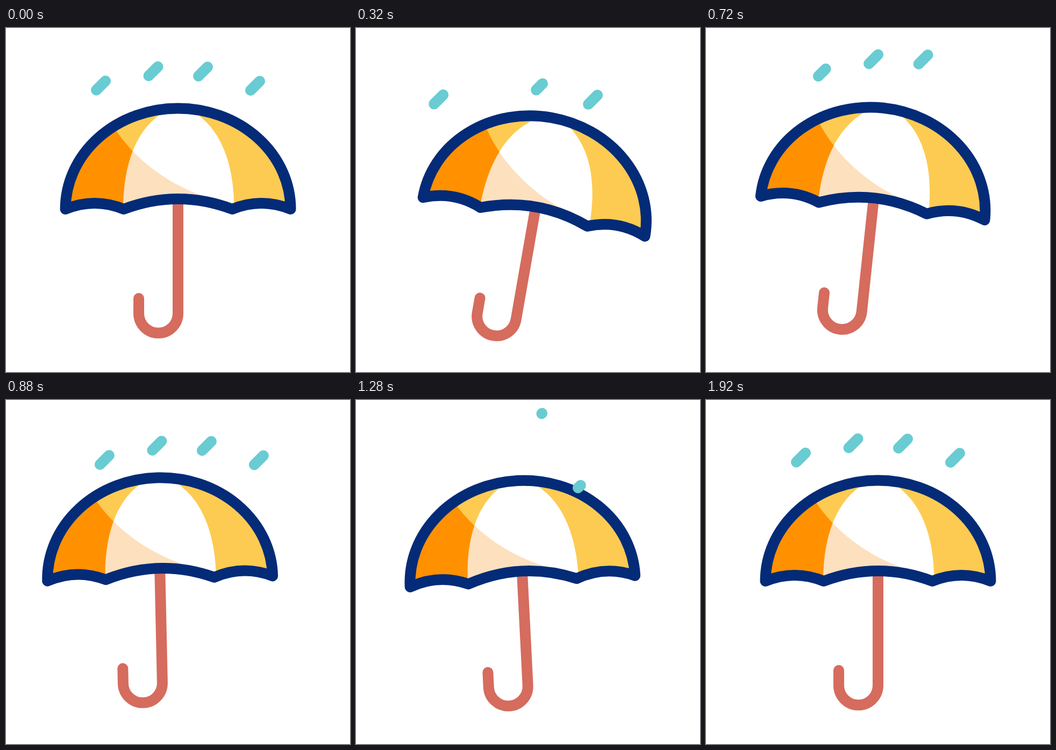
Recreate the animation shown at these times as an HTML page with a canvas. Size 640x640 px, loop 2000 ms.

```html
<!DOCTYPE html>
<html lang="en">
<head>
<meta charset="utf-8">
<title>Umbrella in the rain</title>
<style>
  html, body { margin: 0; width: 100%; height: 100%; overflow: hidden; background: #fff; }
  canvas { display: block; }
</style>
</head>
<body>
<canvas id="stage" width="640" height="640"></canvas>
<script>
const ctx = document.getElementById('stage').getContext('2d');
ctx.lineCap = ctx.lineJoin = 'round';
ctx.lineWidth = 20;

const canopy = new Path2D('M110.5 337A209.5 187.5 0 0 1 529.5 337Q475 315 421 337Q320 299 219 337Q165 315 110.5 337Z');
const leftPanel = new Path2D('M218 337C218 250 244 185 296 155L296 100H60V345H218Z');
const rightPanel = new Path2D('M424.5 337C424.5 250 398.5 185 346.5 155L346.5 100H580V345H424.5Z');
const shade = new Path2D('M195 175C230 235 290 285 365 312V345H60V175Z');
const handle = new Path2D('M320 325V531A36.5 36.5 0 0 1 247 531V503');

// Key rows: time, values...
const turnKeys = [[0, 0], [480, 13.4], [1020, -4.2], [1720, 0]];
const moveKeys = [[0, 0, 0], [440, -28.6, 14], [800, -31.3, -5.4], [1280, 0, 0]];

// Lower end of each drop at rest, in order of appearance
const drops = [[265.5, 89], [358, 89.5], [168, 115.5], [455, 116]];
const dropLength = 17;

// Each shower: path keys, start and stagger of growing, start and stagger of shrinking
const high = [78, -58], low = [-42, 47.5];
const showers = [
  { path: [[0, 0, 0], [605, ...low]], grow: [-2000, 90], shrink: [203, 90] },
  { path: [[360, ...high], [1285, ...low]], grow: [515, 73], shrink: [942, 91] },
  { path: [[1080, ...high], [1810, 0, 0]], grow: [1275, 118], shrink: [9000, 90] }
];

const clamp = x => Math.min(1, Math.max(0, x));
const smooth = s => s * s * (3 - 2 * s);

function ease(keys, t) {
  let i = 1;
  while (i < keys.length - 1 && t > keys[i][0]) i++;
  const [t0, ...a] = keys[i - 1], [t1, ...b] = keys[i];
  const k = smooth(clamp((t - t0) / (t1 - t0)));
  return a.map((v, n) => v + (b[n] - v) * k);
}

function fill(path, color) {
  ctx.fillStyle = color;
  ctx.fill(path);
}

function stroke(path, color) {
  ctx.strokeStyle = color;
  ctx.stroke(path);
}

function drawUmbrella(t) {
  const [turn] = ease(turnKeys, t), [dx, dy] = ease(moveKeys, t);
  ctx.save();
  ctx.translate(320 + dx, 537 + dy);
  ctx.rotate(turn * Math.PI / 180);
  ctx.translate(-320, -537);
  stroke(handle, '#d56c5e');
  ctx.save();
  ctx.clip(canopy);
  fill(canopy, '#fff');
  fill(shade, '#fde0be');
  fill(leftPanel, '#fdcb52');
  fill(rightPanel, '#fdcb52');
  ctx.clip(leftPanel);
  fill(shade, '#ff9100');
  ctx.restore();
  stroke(canopy, '#042b77');
  ctx.restore();
}

function drawShower({ path, grow, shrink }, t) {
  const [dx, dy] = ease(path, t);
  drops.forEach(([x, y], i) => {
    const phase = ([start, step]) => (t - start - i * step) / step;
    const grown = phase(grow), shrunk = phase(shrink);
    if (grown < 0 || shrunk >= 1) return;
    const front = dropLength * (1 - clamp(grown));
    const back = dropLength * (1 - clamp(shrunk));
    const line = new Path2D();
    line.moveTo(x + dx + front, y + dy - front);
    line.lineTo(x + dx + back + 0.01, y + dy - back);
    stroke(line, '#68ccd2');
  });
}

function draw(now) {
  const t = Math.min(1920, Math.floor(now % 2000 / 40) * 40);
  ctx.fillStyle = '#fff';
  ctx.fillRect(0, 0, 640, 640);
  drawUmbrella(t);
  showers.forEach(s => drawShower(s, t));
}

const begin = performance.now();
function tick() {
  draw(performance.now() - begin);
  requestAnimationFrame(tick);
}
tick();
</script>
</body>
</html>
```
